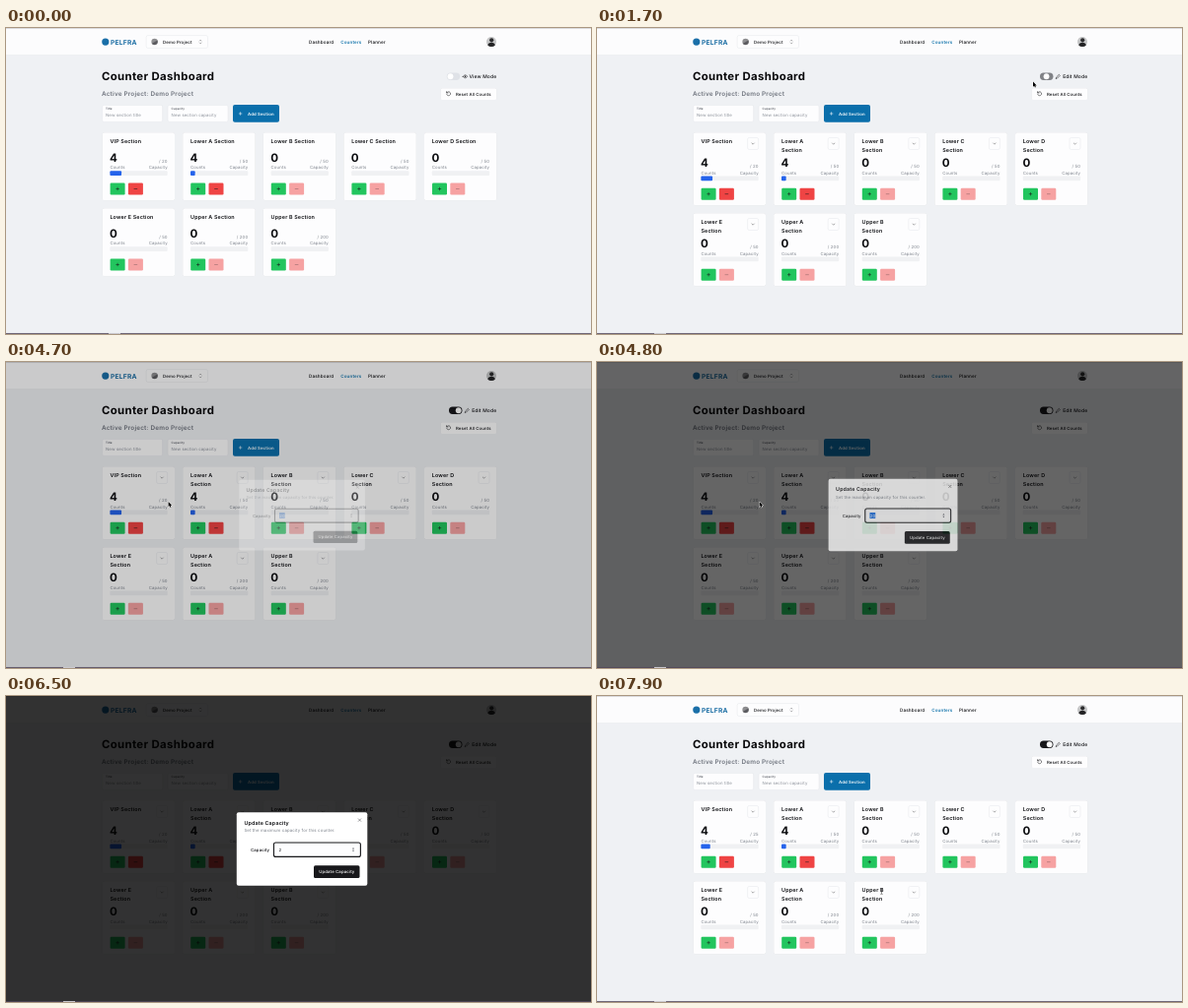
Write an HTML page that moves like this. It is 593 px wide and 311 px high and loops after 8000 ms.

```html
<!DOCTYPE html>
<html lang="en">
<head>
<meta charset="utf-8">
<title>Counter Dashboard</title>
<style>
html, body { margin: 0; width: 100%; height: 100%; overflow: hidden; background: #eff1f4; }
svg { display: block; width: 593px; height: 311px; }
text { font-family: Inter, "Open Sans", sans-serif; letter-spacing: .03em; text-rendering: geometricPrecision; white-space: pre; }
.line { fill: none; stroke: #18181b; stroke-width: .55; stroke-linecap: round; stroke-linejoin: round; }
.card { fill: #fdfdfe; filter: drop-shadow(0 .4px .6px #00000022); }
.pop { fill: #fff; stroke: #e4e6ea; stroke-width: .5; filter: drop-shadow(0 .8px 1.2px #00000026); }
#cursor path { paint-order: stroke; stroke: #fff; stroke-width: .9; stroke-linejoin: round; }
</style>
</head>
<body>
<svg id="stage" viewBox="0 0 593 311"></svg>
<script>
const INK = '#0c0d10', GRAY = '#7b808a', BLUE = '#0b6fab', EDGE = '#e5e7eb';
const $ = id => document.getElementById(id);

const rect = (x, y, w, h, fill, r = 0, extra = '') =>
  `<rect x="${x}" y="${y}" width="${w}" height="${h}" rx="${r}" fill="${fill}" ${extra}/>`;
const box = (x, y, w, h, r = 1.6) => rect(x, y, w, h, '#fdfdfe', r, `stroke="${EDGE}" stroke-width=".5"`);
const text = (x, y, str, size, fill = INK, weight = 500, extra = '') =>
  `<text x="${x}" y="${y}" font-size="${size}" fill="${fill}" font-weight="${weight}" ${extra}>${str}</text>`;
const line = (d, extra = '') => `<path class="line" d="${d}" ${extra}/>`;
const group = (id, body) => `<g id="${id}">${body}</g>`;
const END = 'text-anchor="end"', MID = 'text-anchor="middle"';
const pencil = (x, y) => line(`M${x} ${y + 4}l.4-1.4 2.6-2.6 1 1-2.6 2.6z`);

const sections = [
  ['VIP', 4, 20], ['Lower A', 4, 50], ['Lower B', 0, 50], ['Lower C', 0, 50], ['Lower D', 0, 50],
  ['Lower E', 0, 50], ['Upper A', 0, 200], ['Upper B', 0, 200]
];
const BAR = 58.3;

function card([name, count, cap], i, edit) {
  const h = edit ? 74 : 69, dy = edit ? 5.2 : 0;
  const x = 97.6 + 81.6 * (i % 5), y = 106.2 + (h + 8) * Math.floor(i / 5);
  const wrap = edit && i > 0, id = k => edit && !i ? `id="${k}"` : '';
  const right = 66.1, on = count > 0;
  const title = wrap
    ? text(7.8, 11, name, 5.4, INK, 600) + text(7.8, 19.8, 'Section', 5.4, INK, 600)
    : text(7.8, 11, name + ' Section', 5.4, INK, 600);
  const more = edit ? box(55, 5.3, 11, 12) + line('M59.3 10.8l1.2 1.2 1.2-1.2', 'stroke-opacity=".7"') : '';
  return `<g transform="translate(${x} ${y})">
    ${rect(0, 0, 73.4, h, '#fff', 2, 'class="card"')}${title}${more}
    <g transform="translate(0 ${dy})">
      ${text(7.4, 30, count, 11.6, INK, 700)}
      ${text(right, 30.8, '/ ' + cap, 4.3, GRAY, 400, END + ' ' + id('cap'))}
      ${text(7.8, 37.2, 'Counts', 4.3, GRAY, 400)}
      ${text(right, 37.2, 'Capacity', 4.25, GRAY, 400, END)}
      ${rect(7.8, 39, BAR, 4.8, '#f0f1f3', 1)}
      ${on ? rect(7.8, 39, BAR * count / cap, 4.8, '#2563eb', 1, id('fill')) : ''}
      ${rect(8, 51.3, 15, 12, '#22c55e', 1.2)}${line('M14.2 57.3h2.6M15.5 56v2.6')}
      ${rect(26.3, 51.3, 15, 12, on ? '#ef4444' : '#f6a2a2', 1.2)}
      ${line('M32.4 57.3h2.8', on ? '' : 'stroke-opacity=".45"')}
    </g></g>`;
}

const cards = edit => sections.map((s, i) => card(s, i, edit)).join('');

const header = rect(0, 0, 593, 27.5, '#fcfcfd') + rect(0, 27.2, 593, .5, '#e6e8eb') + rect(0, 0, 593, .6, '#c6c7ca') +
  '<circle cx="100.8" cy="14.1" r="3.6" fill="#1a6fa8"/>' +
  text(106, 16.7, 'PELFRA', 6.7, '#1c6ea4', 700) +
  box(142.2, 7.6, 62.3, 12.8) +
  '<circle cx="150.6" cy="14" r="3.2" fill="#8d8d8f"/><path d="M148 15.8a3.2 3.2 0 0 0 5.4-3.3z" fill="#5c5c60"/>' +
  text(159, 15.7, 'Demo Project', 4.35) +
  line('M196.2 13l.9-.9.9.9M196.2 15l.9.9.9-.9', 'stroke-opacity=".6"') +
  text(307, 15.6, 'Dashboard', 4.6) + text(339.3, 15.6, 'Counters', 4.5, '#1676ad', 600) +
  text(367, 15.6, 'Planner', 4.6) +
  `<circle cx="492" cy="14" r="5" fill="#c4c5c6"/><circle cx="492.2" cy="12.3" r="2.1" fill="#2c2c2e"/>
   <path d="M488.3 17.4q.6-2.7 3.8-2.7t3.7 2.7a5 5 0 0 1-7.5 0z" fill="#232325"/>`;

const heading = text(97, 53.2, 'Counter Dashboard', 11.4, '#08080a', 700) +
  text(97, 69.2, 'Active Project: Demo Project', 6.37, '#6f747e', 600) +
  rect(440.6, 61.2, 56.8, 11.8, '#fff', 1.6, 'class="card"') +
  line('M446.9 65.6a2 2 0 1 1-.3 1.6M446.6 64.6v1.4h1.4') +
  text(456, 68.6, 'Reset All Counts', 4.3);

const form = box(97.6, 78.4, 61, 17) + text(101, 82.9, 'Title', 3, '#4b4f57') +
  text(101, 89.9, 'New section title', 4.3, '#8b9099', 400) +
  box(164, 78.4, 61, 17) + text(167.6, 82.9, 'Capacity', 3, '#4b4f57') +
  text(167.6, 89.9, 'New section capacity', 4.25, '#8b9099', 400) +
  rect(230, 78, 47, 17.8, BLUE, 2) + line('M236.3 87h2.6M237.6 85.7v2.6', 'style="stroke:#fff"') +
  text(245, 88.6, 'Add Section', 4.3, '#fff', 600);

const modeLabel = str => text(497.2, 51, str, 4.94, INK, 500, END);
const eye = line('M463.2 49.3q2.3-3.2 4.6 0q-2.3 3.2-4.6 0z') + '<circle cx="465.5" cy="49.3" r=".8" fill="#18181b"/>';
const toggle = rect(0, 45.6, 13.4, 7.3, '#dfe2e7', 3.65) + rect(0, 45.6, 13.4, 7.3, '#18181b', 3.65, 'id="dark"') +
  '<circle id="knob" cy="49.25" r="2.9" fill="#fff"/>';

const menu = rect(133.6, 125.2, 48.8, 33.8, '#fff', 2, 'class="pop"') +
  rect(134.6, 0, 46.8, 10.8, '#eff1f4', 1.2, 'id="hover"') +
  pencil(136.7, 128.6) + text(144, 132.4, 'Rename', 4.3) +
  line('M136.4 144.2q0-2.1 1.9-2.1t1.9 2.1M140 142q1.1.2 1.1 2') +
  '<circle class="line" cx="138.3" cy="140.8" r="1"/>' + text(144, 143.7, 'Update Capacity', 4.25) +
  line('M136.6 151.8h4M137.1 151.8l.2 3.6h2.6l.2-3.6M137.9 151.8v-.8h1.4v.8') + text(144, 155, 'Delete Section', 4.3);

const dialog = rect(233.8, 118.3, 132.5, 74.5, '#fff', 2) +
  text(241.4, 131, 'Update Capacity', 5.35, INK, 600) +
  text(241.4, 138.4, 'Set the maximum capacity for this counter.', 4.3, GRAY, 400) +
  line('M357.2 124.8l2.6 2.6M359.8 124.8l-2.6 2.6', 'stroke-opacity=".75"') +
  text(267.2, 157.7, 'Capacity', 4.25, INK, 500, END) +
  box(272.4, 149.9, 86.2, 12.5) +
  group('focus', rect(271.4, 149, 88, 14.4, 'none', 2, 'stroke="#18181b" stroke-width="1.1"') +
    '<path d="M351 155.4l1-1.4 1 1.4zM351 156.8l1 1.4 1-1.4z" fill="#55585e"/>') +
  rect(276.2, 153, 5.8, 6.1, '#1b6fe0', 0, 'id="selection"') +
  text(276.4, 157.7, '20', 4.3, INK, 400, 'id="value"') +
  rect(281.7, 153, .5, 6, INK, 0, 'id="caret"') +
  rect(312, 172.3, 46.5, 12.8, '#18181b', 1.6, 'id="submit"') +
  text(335.3, 180.2, 'Update Capacity', 4.3, '#fff', 500, MID);

const shapes = {
  arrow: '<path d="M0 0V5.2L1.2 4.1L2 5.9L2.9 5.5L2.1 3.8H3.7Z"/>',
  beam: '<path d="M-1-3Q0-3 0-2.4Q0-3 1-3M0-2.4V2.4M-1 3Q0 3 0 2.4Q0 3 1 3" style="fill:none;stroke:#222;stroke-width:.5"/>',
  hand: '<path style="fill:#fff;stroke:#111;stroke-width:.5" d="M-.5.4Q0-.4.5.4V2.2L2.5 2.7Q3 2.9 2.9 3.7L2.4 5.7H-.4L-1.9 3.7Q-1.6 2.9-.5 3.6Z"/>'
};

$('stage').innerHTML = rect(0, 0, 593, 311, '#eff1f4') + header + heading + form +
  group('view', cards(false) + modeLabel('View Mode') + eye) +
  group('edit', cards(true) + modeLabel('Edit Mode') + pencil(465.3, 47.3)) +
  group('toggle', toggle) + group('menu', menu) +
  rect(0, 0, 593, 311, '#000', 0, 'id="shade"') + group('dialog', dialog) +
  rect(0, 310.2, 593, .8, '#51465a') + rect(0, 310.2, 12, .8, '#e4e4e8', 0, 'id="mark"') +
  group('cursor', Object.keys(shapes).map(k => group(k, shapes[k])).join(''));

// time, x, y, pointer shape from then on
const route = [
  [0, 565, 247, ''], [100, 560, 238, 'arrow'], [500, 520, 140, 'arrow'], [900, 470, 62, 'arrow'],
  [1300, 456, 50, 'hand'], [1600, 455, 50, 'hand'], [1700, 442, 54.6, 'arrow'], [1900, 442, 54.6, 'arrow'],
  [2100, 242, 136, 'arrow'], [2200, 242, 136, 'arrow'], [2800, 158, 118, 'arrow'], [3100, 158, 119, 'arrow'],
  [3500, 164.6, 142, 'arrow'], [4800, 164.6, 142, 'arrow'], [4900, 173.2, 140.6, 'arrow'],
  [5300, 272, 155, 'beam'], [5400, 279, 156, 'beam'], [5600, 279, 156, ''],
  [7100, 285, 158, 'beam'], [7400, 328.5, 179.4, 'hand'], [7700, 328.5, 179.4, 'hand'],
  [7900, 288.5, 198.5, 'beam'], [8000, 288.5, 198.5, 'beam']
];
const ramp = (t, a, b) => Math.min(1, Math.max(0, (t - a) / (b - a)));
const show = (id, on) => { $(id).style.display = on ? '' : 'none'; };
const set = (id, attrs) => { for (const k in attrs) $(id).setAttribute(k, attrs[k]); };

function render(t) {
  const edit = t >= 1600, k = ramp(t, 1610, 1800), cap = t >= 7700 ? 25 : 20;
  show('view', !edit);
  show('edit', edit);
  set('toggle', { transform: `translate(${edit ? 449 : 446.8} 0)` });
  set('dark', { opacity: k });
  set('knob', { cx: 3.7 + 6 * k });
  set('mark', { x: edit ? 58 : 104 });
  $('cap').textContent = '/ ' + cap;
  set('fill', { width: BAR * 4 / cap });

  set('menu', { opacity: ramp(t, 2800, 3000) * (1 - ramp(t, 4100, 4300)) });
  show('hover', t >= 3200);
  set('hover', { y: t < 3300 ? 125.9 : 136.8 });

  const shown = ramp(t, 4650, 4850) * (1 - ramp(t, 7650, 7850)), scale = .95 + .05 * shown;
  set('shade', { opacity: .8 * shown });
  set('dialog', { opacity: shown, transform: `translate(300 155.5) scale(${scale}) translate(-300 -155.5)` });
  const selected = t < 5600;
  show('focus', t < 7500);
  show('selection', selected);
  show('caret', t >= 5600 && t < 6100 || t >= 6700 && t < 7500);
  $('value').textContent = t < 6500 ? '20' : t < 6700 ? '2' : '25';
  set('value', { fill: selected ? '#fff' : INK });
  set('submit', { fill: t >= 7400 && t < 7800 ? '#303033' : '#18181b' });

  const n = route.findIndex(p => p[0] > t), [t0, x0, y0, shape] = route[n - 1], [t1, x1, y1] = route[n];
  const f = ramp(t, t0, t1);
  set('cursor', { transform: `translate(${x0 + (x1 - x0) * f} ${y0 + (y1 - y0) * f})` });
  for (const s in shapes) show(s, s === shape);
}

const start = performance.now();
let last = -1;
function tick() {
  const t = Math.floor(Math.max(0, performance.now() - start) % 8000 / 100) * 100;
  if (t !== last) render(last = t);
  requestAnimationFrame(tick);
}
tick();
</script>
</body>
</html>
```
